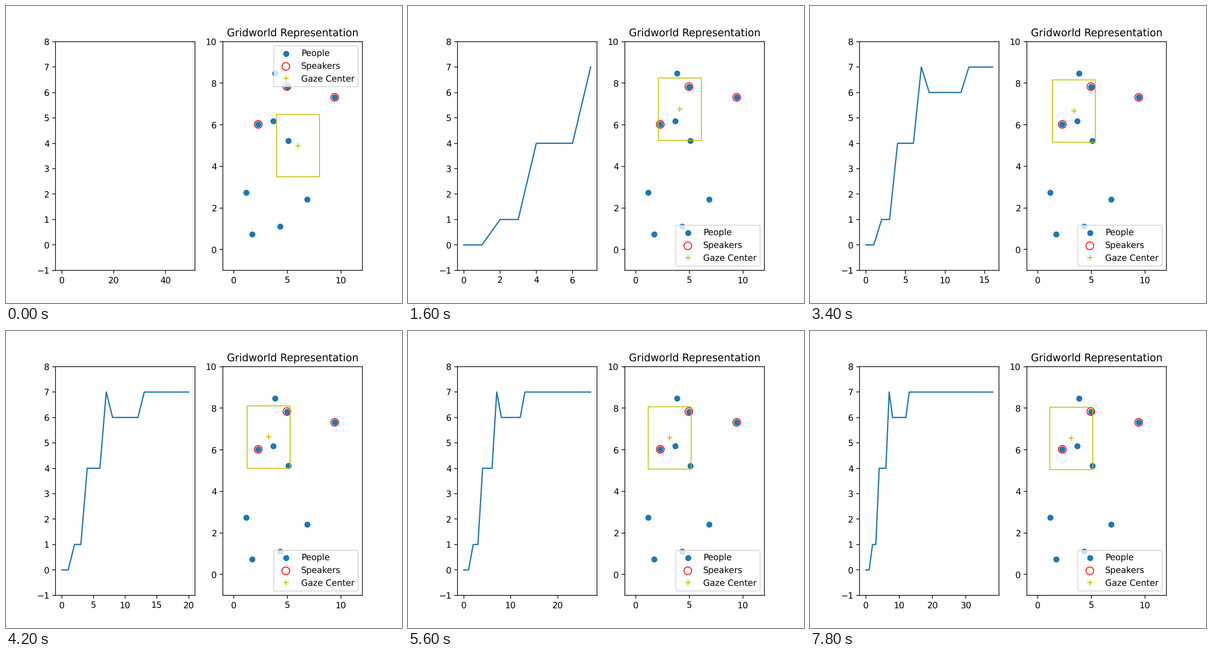
A matplotlib script for the animation above (8000 ms loop, 864 by 648 pixels).

```python
import numpy as np
import matplotlib.pyplot as plt
from matplotlib.animation import FuncAnimation
from matplotlib.patches import Rectangle

# Soft sub-pixel edges and unhinted glyphs
plt.rcParams.update({"path.snap": False, "text.hinting": "no_hinting"})

STEPS, STEP_MS = 40, 200
VIEW = np.array([4, 3])
START, HOME = np.array([6, 5]), np.array([3.13, 6.54])
DRIFT, DRIFT_RATE, SNAP_RATE = np.array([4.07, 1.46]), np.array([0.85, 0.87]), 0.74

# The first three people are speaking
people = np.array([
    (2.30, 6.02), (4.96, 7.84), (9.42, 7.32), (3.86, 8.47), (3.69, 6.17),
    (5.08, 5.23), (1.17, 2.75), (6.85, 2.40), (4.35, 1.11), (1.74, 0.73),
])
speaking = np.arange(len(people)) < 3


def gaze(n):
    """Gaze centre: a slow drift home plus a fast correction at the start."""
    return HOME + DRIFT * DRIFT_RATE ** n + (START - HOME - DRIFT) * SNAP_RATE ** n


def reward(n):
    """People in view count once, speakers three times, less one."""
    seen = (abs(people - gaze(n)) <= VIEW / 2).all(axis=1)
    return seen.sum() + 2 * (seen & speaking).sum() - 1


def step_limits(n):
    if n == 1:
        lo, hi = -0.05, 0.05
    else:
        lo, hi = 0, n - 1 if n else 49
    pad = 0.05 * (hi - lo)
    return lo - pad, hi + pad


rewards = [reward(n) for n in range(STEPS)]

fig, (ax_reward, ax_world) = plt.subplots(1, 2, figsize=(6.4, 4.8), dpi=135)

curve, = ax_reward.plot([], [])
ax_reward.set_ylim(-1, 8)

ax_world.set_title("Gridworld Representation")
ax_world.set_xlim(-1, 12)
ax_world.set_ylim(-1, 10)
ax_world.scatter(*people.T, label="People")
ax_world.scatter(*people[speaking].T, s=80, facecolors="none", edgecolors="r",
                 label="Speakers")
center, = ax_world.plot([], [], "y+", label="Gaze Center")
view = ax_world.add_patch(Rectangle((0, 0), *VIEW, edgecolor="y", fill=False))
legend = ax_world.legend(loc="upper right")


def update(n):
    curve.set_data(range(n), rewards[:n])
    ax_reward.set_xlim(*step_limits(n))

    pos = gaze(n)
    center.set_data(pos[:1], pos[1:])
    view.set_xy(pos - VIEW / 2)

    # The legend makes room once the view reaches it
    blocked = view.get_y() + view.get_height() > 7.87
    legend.set_loc("lower right" if blocked else "upper right")
    return curve, center, view, legend


anim = FuncAnimation(fig, update, frames=STEPS, interval=STEP_MS,
                     init_func=lambda: update(0), repeat=True, repeat_delay=0)
plt.show()
```
